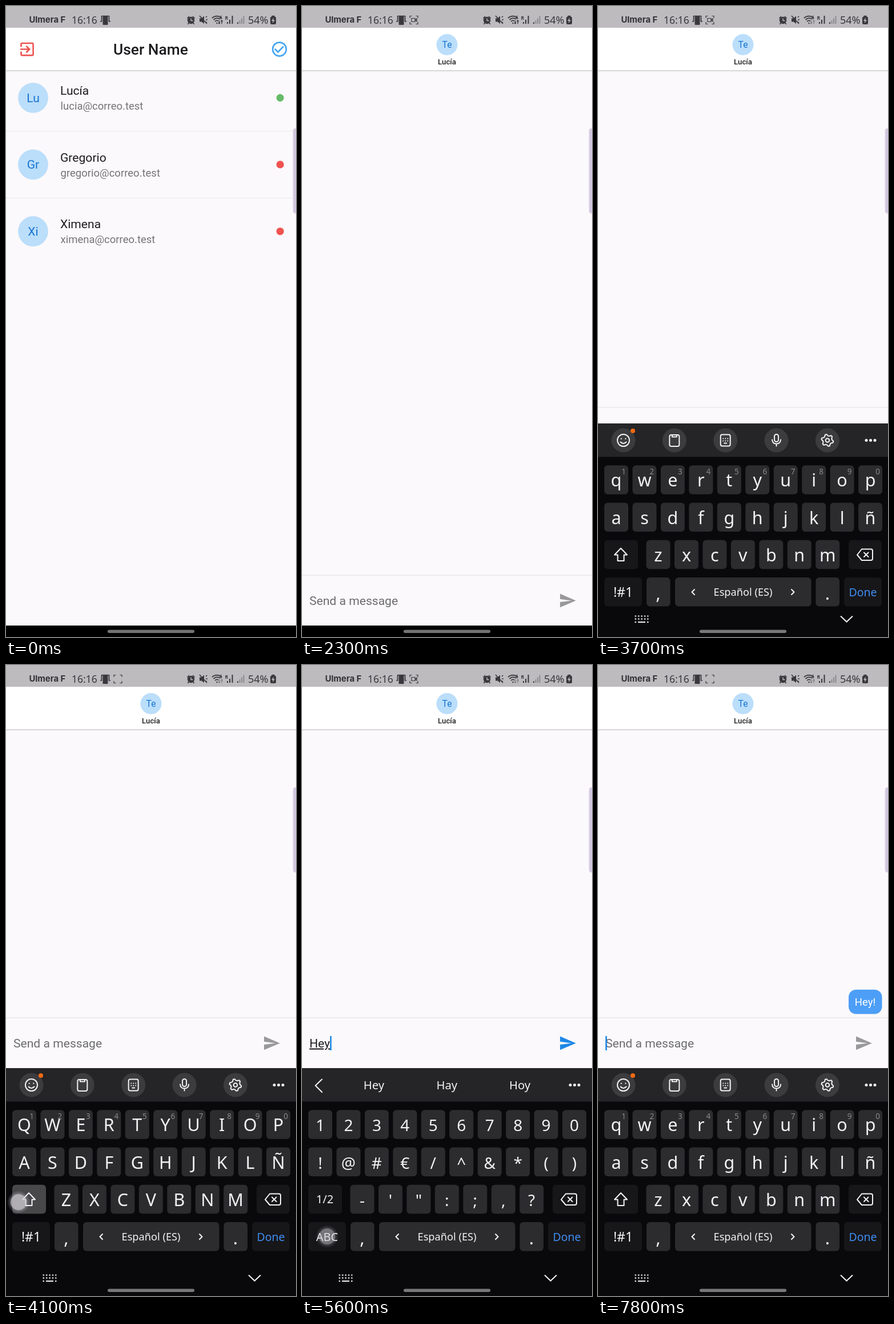
Animation of 508x1102 px, one loop 8000 ms. Source, as an HTML page:

```html
<!DOCTYPE html>
<html lang="en">
<head>
<meta charset="utf-8">
<title>Chat demo</title>
<style>
  html, body { margin: 0; width: 100%; height: 100%; overflow: hidden; background: #fbf9fb; }
  svg { display: block; width: 508px; height: 1102px; }
  text { font-family: Roboto, sans-serif; white-space: pre; }
  .mid { text-anchor: middle; }
  .sys, .kb text { font-family: "Noto Sans", sans-serif; }
  .kb text { text-anchor: middle; fill: #f3f2f4; }
  .line { fill: none; stroke: #f3f2f4; stroke-width: 2; stroke-linecap: round; stroke-linejoin: round; }
  .ink { fill: none; stroke: #3a383c; stroke-width: 1.7; }
  .thin { stroke-width: 1.2; }
  .composing { text-decoration: underline; text-decoration-thickness: 1.5px; text-underline-offset: 2px; }
</style>
</head>
<body>
<svg viewBox="0 0 508 1102">
  <defs>
    <radialGradient id="glow">
      <stop offset=".6" stop-color="#e4e2e8" stop-opacity=".4"/>
      <stop offset="1" stop-color="#e4e2e8" stop-opacity="0"/>
    </radialGradient>
    <g id="bar">
      <rect y="38" width="508" height="75" fill="#fff"/>
      <rect y="112" width="508" height="1.6" fill="#d0ced2"/>
      <rect y="113.6" width="508" height="1.4" fill="#efeef0"/>
    </g>
  </defs>

  <g id="home">
    <rect width="508" height="1082" fill="#fbf9fb"/>
    <use href="#bar"/>
    <path transform="translate(21.2 59.7) scale(1.32)" fill="#ef5350" d="M10.09 15.59L11.5 17l5-5-5-5-1.41 1.41L12.67 11H3v2h9.67zM19 3H5c-1.11 0-2 .9-2 2v4h2V5h14v14H5v-4H3v4c0 1.1.89 2 2 2h14c1.1 0 2-.9 2-2V5c0-1.1-.9-2-2-2z"/>
    <text class="mid" x="253.5" y="85" font-size="26.4" font-weight="500" fill="#1d1c1f">User Name</text>
    <path transform="translate(463.2 59.7) scale(1.32)" fill="#42a5f5" d="M16.59 7.58L10 14.17l-3.59-3.58L5 12l5 5 8-8zM12 2C6.48 2 2 6.48 2 12s4.48 10 10 10 10-4.48 10-10S17.52 2 12 2zm0 18c-4.42 0-8-3.58-8-8s3.58-8 8-8 8 3.58 8 8-3.58 8-8 8z"/>
    <g id="contacts"></g>
  </g>

  <g id="chat">
    <rect y="38" width="508" height="1044" fill="#fbf9fb"/>
    <use href="#bar"/>
    <circle cx="254" cy="67.5" r="18.5" fill="#bbdefb"/>
    <text class="mid" x="254" y="73" font-size="15.8" fill="#1976d2">Te</text>
    <text class="mid" x="254" y="101.5" font-size="13.2" font-weight="500" fill="#1d1c1f">Lucía</text>
    <g id="bubble">
      <rect x="439" y="567" width="58.5" height="42.5" rx="13" fill="#4d9ef6"/>
      <text class="mid" x="468" y="595" font-size="18.5" fill="#fff">Hey!</text>
    </g>
    <g id="composer">
      <rect y="994" width="508" height="88" fill="#fbf9fb"/>
      <rect y="993.5" width="508" height="1.2" fill="#e6e5e8"/>
      <text id="hint" x="13" y="1045.5" font-size="21.1" fill="#6c6b6e">Send a message</text>
      <text id="typed" x="13" y="1045.5" font-size="21.1" fill="#1d1c1f"></text>
      <rect id="cursor" y="1026" width="2.6" height="25" fill="#1e88e5"/>
      <path id="send" transform="translate(449.4 1022.6) scale(1.32)" d="M2.01 21L23 12 2.01 3 2 10l15 2-15 2z"/>
    </g>
  </g>

  <g id="status">
    <rect width="508" height="38" fill="#bdbbbe"/>
    <text x="40.5" y="28.8" font-size="14.8" font-weight="700" fill="#333135" style="font-family:Inter,sans-serif">Ulmera F</text>
    <g fill="#3a383c" font-size="18">
      <text class="sys" x="115" y="30.5" font-size="17.5">16:16</text>
      <text class="sys" x="424" y="30.5">54%</text>
      <rect x="169.5" y="18" width="9" height="15" rx="1"/>
      <path class="ink" d="M168 17.5H180M167.5 17V27H165M180.5 17V27H183"/>
      <path class="ink thin" data-on="300 8000" d="M189 21V17.5H192.5M199.5 17.5H203V21M203 28V31.5H199.5M192.5 31.5H189V28"/>
      <path class="ink thin" data-on="300 800 1300 1800 2300 2800 3300 3800 4300 4800 5300 5800 6300 6800 7300 7800" d="M192 21.5H198V27.5H192ZM198 24.5L201 22V27Z"/>
      <circle cx="324" cy="25" r="6.2"/>
      <path fill="none" stroke="#bdbbbe" stroke-width="1.4" d="M324 21.5V25.5H327.5"/>
      <g class="ink">
        <path d="M317.5 21.5L321 18M330.5 21.5L327 18M320 29.5L318.5 32M328 29.5L329.5 32"/>
        <path d="M339 17L352 31M350 20L352 18M350 24H353M350 28L352 29"/>
        <path d="M361 21C366 16.5 373 16.5 378 21M363.5 24C367.5 20.5 371.5 20.5 374.5 23M366 27C368.5 25 370.5 25 372 26.5"/>
        <path stroke-width="2" d="M388 31V28M392 31V24M396.5 31V17M406 31V28.5"/>
        <path stroke="#8e8c90" stroke-width="2" d="M409.5 31V25M413 31V21.5M416.5 31V17.5"/>
        <path id="arrows" stroke-width="1.3" d="M373.5 25V31M372 29L373.5 31L375 29M378 31V25M376.5 27L378 25L379.5 27"/>
      </g>
      <path d="M339 21.5H342.5L347 17.5V31L342.5 27.5H339ZM368 30L369.5 31.5L371 30L369.5 28.5Z"/>
      <text class="sys" x="374" y="23" font-size="8" font-weight="700">6</text>
      <text class="sys" x="383.5" y="24" font-size="8.5" font-weight="700">R</text>
      <rect x="463" y="18.5" width="10" height="13.5" rx="2.5"/><rect x="465.5" y="16.8" width="5" height="3"/>
      <path fill="#bdbbbe" d="M469 20.5L465 26H467.5L466.8 30L471 24.5H468.3Z"/>
    </g>
  </g>

  <rect y="1082" width="508" height="20" fill="#000"/>
  <g id="keyboard" class="kb"></g>
  <g data-on="3500 8000" fill="none" stroke="#f3f2f4" stroke-width="2">
    <path d="M425 1065.5L435.5 1075.5L446 1065.5"/>
    <path stroke-dasharray="2.6 2.8" d="M64.5 1065.5H88.5M64.5 1070.5H88.5"/>
    <path d="M64.5 1076H67M70 1076H83M86 1076H88.5"/>
  </g>
  <rect x="178" y="1089.5" width="152" height="5.5" rx="2.7" fill="#fff" opacity=".45"/>
  <path d="M508 214H506Q503 214 503 218V358Q503 362 506 362H508Z" fill="#d1c6e1" stroke="#dfdae5"/>
  <g id="touch">
    <circle r="20" fill="url(#glow)"/>
    <circle r="14" fill="#c6c4c9" opacity=".65"/>
  </g>
</svg>

<script>
const LOOP = 8000, PITCH = 49.45;
const $ = id => document.getElementById(id);
const clamp = v => Math.min(1, Math.max(0, v));

const label = (s, x, y, size, extra = '') =>
  `<text x="${x}" y="${y}" font-size="${size}" ${extra}>${s.replace(/&/g, '&amp;').replace(/</g, '&lt;')}</text>`;
const group = (on, inner) => `<g data-on="${on}">${inner}</g>`;
const key = (x, y, w, fill = '#2c2b2e') =>
  `<rect x="${x}" y="${y}" width="${w}" height="50.5" rx="6" fill="${fill}"/>`;

// Contacts
$('contacts').innerHTML = [['Lucía', 'lucia', '#66bb6a'], ['Gregorio', 'gregorio', '#ef5350'], ['Ximena', 'ximena', '#ef5350']]
  .map(([name, user, dot], i) => `<g transform="translate(0 ${i * 116.6})">
    ${i ? '<rect y="101.5" width="508" height="1.2" fill="#ebeaed"/>' : ''}
    <circle cx="47.5" cy="160.3" r="26.4" fill="#bbdefb"/>
    ${label(name.slice(0, 2), 47.5, 167.5, 21.1, 'class="mid" fill="#1976d2"')}
    ${label(name, 95, 155, 21.1, 'fill="#1d1c1f"')}
    ${label(user + '@correo.test', 95.5, 181, 18.5, 'fill="#757477"')}
    <circle cx="480.2" cy="160.3" r="6.6" fill="${dot}"/></g>`).join('');

// Keyboard
const ROWS = [[32, 777.3], [32, 842.5], [105.5, 907.7]];
const LETTERS = ['qwertyuiop', 'asdfghjklñ', 'zxcvbnm'];
const SYMBOLS = ['1234567890', '!@#€/^&*()', '-\'":;,?'];
const eachKey = (rows, draw) => rows.map((row, r) =>
  [...row].map((ch, i) => draw(ch, ROWS[r][0] + i * PITCH, ROWS[r][1])).join('')).join('');
const glyphs = (rows, size = 30.5) => eachKey(rows, (ch, x, y) => label(ch, x, y + 37, size));
const digits = [...'1234567890'].map((d, i) =>
  label(d, 45 + i * PITCH, 793, 13.5, 'style="fill:#89888b"')).join('');
const shift = '<path class="line" d="M40 922L51 933.5H45.5V944H34.5V933.5H29Z"/>';

const keys = eachKey(LETTERS, (ch, x, y) => key(x - 21, y, 42)) +
  key(11, 907.7, 59, '#171619') + key(439, 907.7, 58, '#171619') + key(11, 973, 66, '#171619') +
  key(85, 973, 41.5) + key(135, 973, 238.5) + key(381.5, 973, 41.5) + key(431, 973, 66, '#171619') +
  group('4100 4500', key(11, 907.7, 59, '#48474a')) +
  group('0 4100 4500 5600 6500 8000', glyphs(LETTERS)) +
  group('4100 4500', glyphs(LETTERS.map(r => r.toUpperCase()))) +
  group('0 5600 6500 8000', digits + shift + label('!#1', 44, 1006.5, 23, 'font-weight="500"')) +
  group('5600 6500', glyphs(SYMBOLS, 28) + label('1/2', 40, 940, 20) + label('ABC', 44, 1006, 20)) +
  label(',', 105.5, 1012, 31) + label('.', 402, 1012, 31) +
  label('Español (ES)', 254, 1005, 18.2) + label('Done', 464, 1005.5, 19.5, 'style="fill:#3f8ef2"') +
  `<path class="line" d="M169 994L164.5 998.5L169 1003M339 994L343.5 998.5L339 1003"/>
   <path class="line" d="M462 923.5H478Q481 923.5 481 926.5V940Q481 943 478 943H462L454 933.5ZM466 929.5L473.5 937M473.5 929.5L466 937"/>`;

const toolIcons = [
  '<circle r="10.5"/><path d="M-3.8 -3V-2.6M3.8 -3V-2.6M-5 3Q0 8 5 3"/>',
  '<rect x="-8.5" y="-9.5" width="17" height="20" rx="3"/><path d="M-4 -9.5V-6H4V-9.5"/>',
  '<rect x="-8.5" y="-10" width="17" height="20" rx="3"/><path d="M-4 -3H-3.9M0 -3H.1M4 -3H4.1M-4 1H-3.9M0 1H.1M4 1H4.1M-2 5H2"/>',
  '<rect x="-3.5" y="-10.5" width="7" height="13" rx="3.5"/><path d="M-7.5 -1Q-7 6 0 6T7.5 -1M0 6V10"/>',
  `<circle r="3.3"/><path d="${[...Array(24)].map((_, i) => {
    const a = (i + .5) * Math.PI / 12, r = i % 4 < 2 ? 10.5 : 8;
    return (i ? 'L' : 'M') + (r * Math.cos(a)).toFixed(1) + ' ' + (r * Math.sin(a)).toFixed(1);
  }).join('')}Z"/>`];
const tools = toolIcons.map((icon, i) => `<g transform="translate(${44.5 + i * 89.35} 733.5)">
  <circle r="21" fill="#3c3b3e"/><g class="line">${icon}</g></g>`).join('') +
  '<circle cx="61" cy="717" r="4" fill="#f26a12"/>';
const words = list => list.map((w, i) => label(w, 126 + i * 127.8, 741, 20.3)).join('');
const puncts = [...'?!."\':'].map((p, i) => label(p, 93 + i * 64, 741, 20)).join('');
const more = [470, 477.5, 485].map(x => `<circle cx="${x}" cy="733.5" r="2.5"/>`).join('');

const popup = (on, ch, x, y) => {
  const left = Math.max(12, x - 38);
  return group(on, `<rect x="${left}" y="${y}" width="76" height="98" rx="12" fill="#252427"/>` +
    label(ch, left + 38, y + 67, 44));
};

$('keyboard').innerHTML = `<rect y="704" width="508" height="398" fill="#09090b"/>
  <rect y="704" width="508" height="58.5" fill="#252427"/>` + keys +
  group('0 4500 7500 8000', tools) +
  group('4500 7500', '<path class="line" d="M35 723.5L23.5 734.5L35 746"/>') +
  group('4500 5000', words(['H', 'Hola', 'Ho'])) +
  group('5000 5400', words(['He', 'Hey', 'Hecho'])) +
  group('5400 6200', words(['Hey', 'Hay', 'Hoy'])) +
  group('6200 7500', puncts + `<g fill="#5c5b5e">${more}</g>`) +
  group('0 6200 7500 8000', `<g fill="#f3f2f4">${more}</g>`) +
  popup('4400 4700', 'H', 278.5, 736) + popup('4800 5100', 'e', 131, 671) +
  popup('5200 5500', 'y', 278.5, 671) + popup('6100 6300', '!', 32, 736);

// Timeline
const TOUCHES = [ // press, release, x, y
  [300, 400, 250, 165], [1200, 1500, 242, 1014], [2700, 2800, 62, 1019], [3300, 3400, 174, 1052],
  [4100, 4200, 22, 938], [4400, 4500, 279, 868], [4800, 5000, 131, 802], [5200, 5300, 280, 803],
  [5500, 5600, 44, 998], [6100, 6200, 34, 868], [6400, 6500, 241, 986], [7300, 7400, 468, 662]];
const TEXTS = [[0, ''], [4500, 'H'], [4900, 'He'], [5300, 'Hey'], [6200, 'Hey!'], [6500, 'Hey! '], [7500, '']];
const CURSOR = [3500, 3900, 4500, 5800, 6200, 7000, 7500, 8000];
const SLIDE = [[3300, 398], [3400, 305], [3500, 227], [3600, 85], [3700, 25], [3800, 0]];

const inSpans = (spans, t) => spans.some((a, i) => i % 2 === 0 && t >= a && t < spans[i + 1]);
const slideAt = t => (SLIDE.filter(s => s[0] <= t).pop() || SLIDE[0])[1];
const timed = [...document.querySelectorAll('[data-on]')]
  .map(el => [el, el.dataset.on.split(' ').map(Number)]);
const show = (el, on) => { el.style.display = on ? '' : 'none'; };
const shiftY = (el, y) => el.setAttribute('transform', `translate(0 ${y})`);

function render(t) {
  for (const [el, spans] of timed) show(el, inSpans(spans, t));

  const enter = clamp((t - 300) / 300);
  shiftY($('chat'), 275 * (1 - enter) ** 3);
  $('chat').setAttribute('opacity', enter ** 1.5);

  // The page resizes one step after the keyboard moves.
  shiftY($('keyboard'), slideAt(t));
  shiftY($('composer'), -Math.max(0, 378 - slideAt(t - 100)));
  show($('keyboard'), t >= 3400);

  const text = TEXTS.filter(s => s[0] <= t).pop()[1], typed = $('typed');
  typed.textContent = text;
  typed.setAttribute('class', t < 6200 ? 'composing' : '');
  show($('hint'), !text);
  $('send').setAttribute('fill', text ? '#1e88e5' : '#99989b');
  show($('cursor'), inSpans(CURSOR, t));
  $('cursor').setAttribute('x', 13 + (text ? typed.getComputedTextLength() : 0));

  const grow = 1 - (1 - clamp((t - 7400) / 400)) ** 2;
  shiftY($('bubble'), 24.5 * (1 - grow));
  $('bubble').setAttribute('opacity', grow);

  $('arrows').style.opacity = t < 2700 ? 1 : .45;

  const tap = TOUCHES.find(([from, to]) => t >= from && t < to + 300);
  show($('touch'), tap);
  if (tap) {
    const [, to, x, y] = tap;
    $('touch').setAttribute('transform', `translate(${x} ${y})`);
    $('touch').setAttribute('opacity', t < to ? 1 : 1 - .325 * ((t - to) / 100 + 1));
  }
}

let start;
function tick(now) {
  start ??= now;
  render(Math.floor((now - start) % LOOP / 100) * 100);
  requestAnimationFrame(tick);
}
render(0);
requestAnimationFrame(tick);
</script>
</body>
</html>
```
